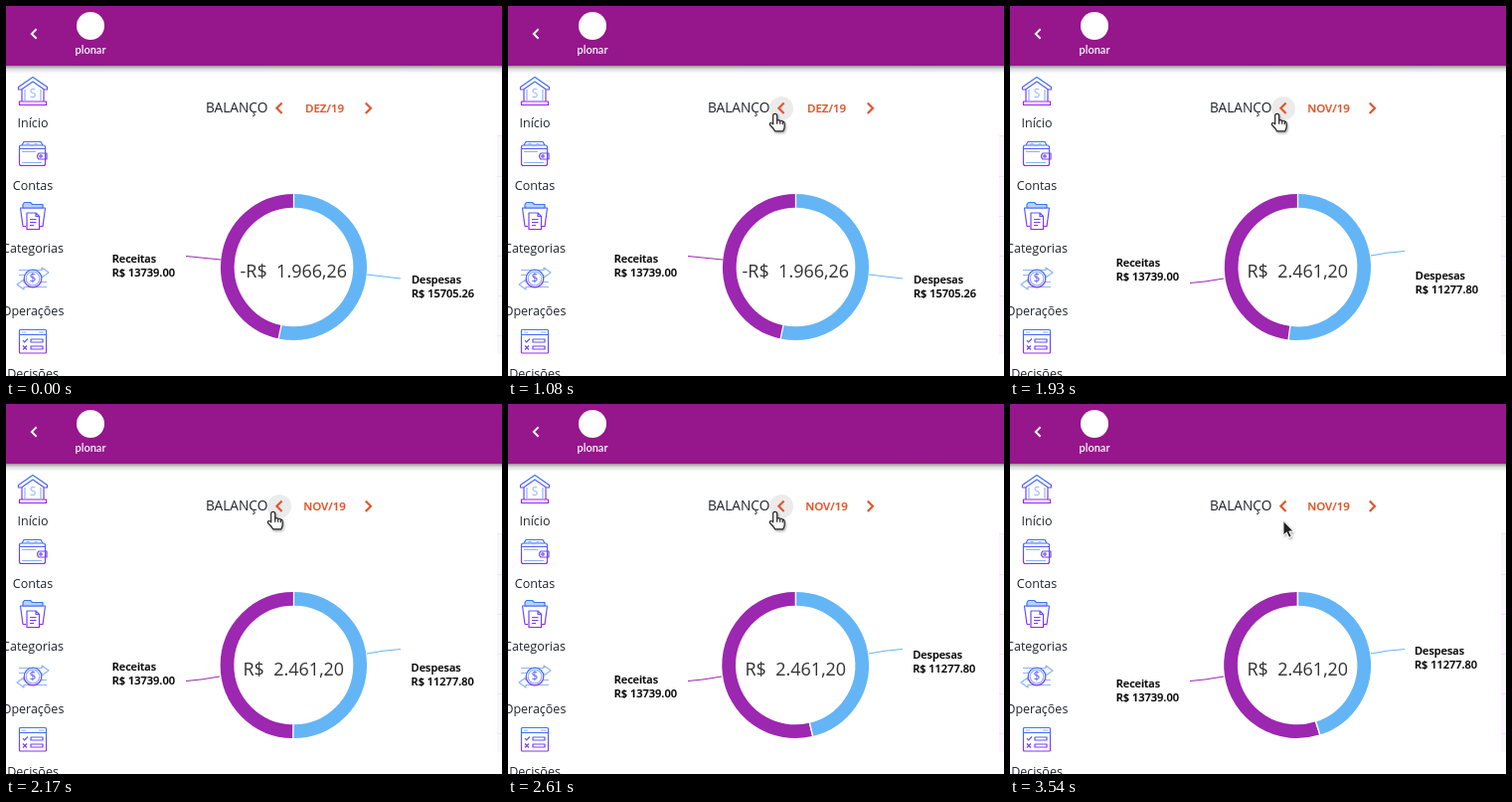
Recreate the animation shown at these times as an HTML page. Size 499 by 372 pixels, loop 3.6 s.

```html
<!DOCTYPE html>
<html lang="pt">
<head>
<meta charset="utf-8">
<style>
html, body { margin: 0; width: 100%; height: 100%; overflow: hidden; background: #fff; }
svg { display: block; width: 499px; height: 372px; font-family: "Open Sans", "Noto Sans", sans-serif; }
.menu { font-size: 12.5px; fill: #212529; text-anchor: middle; }
.label { font-size: 11px; font-weight: 600; fill: #000; stroke: #000; stroke-width: .2; }
.chevron { fill: none; stroke-width: 2.2; }
.icons { fill: none; stroke: url(#ink); stroke-width: 1.2; stroke-linejoin: round; }
.icons text { font-size: 12px; fill: #5b55f5; stroke: none; text-anchor: middle; }
.icons .faint { fill: #8fb4fa; }
.pale { stroke: #8fb4fa; }
</style>
</head>
<body>
<svg viewBox="0 0 499 372">
  <defs>
    <linearGradient id="ink" gradientUnits="userSpaceOnUse" x1="0" y1="0" x2="0" y2="28">
      <stop offset="0" stop-color="#2f7df6"/><stop offset="1" stop-color="#9a22f2"/>
    </linearGradient>
    <linearGradient id="shade" x1="0" y1="0" x2="0" y2="1">
      <stop offset="0" stop-color="#000" stop-opacity=".42"/>
      <stop offset=".4" stop-color="#000" stop-opacity=".14"/>
      <stop offset="1" stop-color="#000" stop-opacity="0"/>
    </linearGradient>
    <filter id="soft" x="-50%" y="-50%" width="200%" height="200%">
      <feDropShadow dx="1" dy="1.5" stdDeviation="1" flood-opacity=".35"/>
    </filter>
  </defs>

  <rect width="499" height="372" fill="#fff"/>
  <rect y="60" width="499" height="8" fill="url(#shade)"/>
  <rect width="499" height="60" fill="#96168c"/>
  <path class="chevron" d="M30.600 23.300l-4.800 4.700 4.800 4.700" stroke="#fff" style="stroke-width:1.9"/>
  <circle cx="85" cy="20" r="14" fill="#fff"/>
  <text x="85" y="48" fill="#fff" font-size="11" font-weight="600" text-anchor="middle" style="font-family:Lato,sans-serif">plonar</text>

  <g class="icons">
    <g transform="translate(12 71)">
      <path d="M.5 10.500L15 .5l14.500 10v2.500h-3L15 5 3.500 13h-3zM4 13v12M26 13v12M1.500 25h27v3.500h-27z"/>
      <path class="pale" d="M7 13v12M23 13v12"/>
      <text class="faint" x="15" y="21">S</text>
    </g>
    <g transform="translate(13 135)">
      <path d="M3 5l2-3.500h17l2 3.500M2.500 5h22q2 0 2 2v16.500q0 2-2 2h-22q-2 0-2-2V7q0-2 2-2zM.5 8.500h26M20 13h8v6h-8q-3-3 0-6z"/>
      <path class="pale" d="M7 4.500q2-2 4 0t4 0 4 0M3 11.500h14M3 22.500h20"/>
      <circle cx="22" cy="16" r="1.200"/>
    </g>
    <g transform="translate(14 197)">
      <path d="M3 24.500L.5 6h25l-2.500 18.500h-4M3 24.500h3"/>
      <path d="M3 6V2.500l1.500-2h6l2 2H23V6z" fill="#b9d2fd"/>
      <path d="M7 11h9l3.500 3.500v13H7zM16 11v3.500h3.500M10 17.500h6.500M10 20.500h6.500M10 23.500h4"/>
    </g>
    <g transform="translate(11 261)">
      <path class="pale" d="M2 4.500h23V2l7 5-7 5V9.500H2M30 16.500H7V14l-7 5 7 5v-2.500h23"/>
      <circle cx="16" cy="13" r="8.800" fill="#fff"/>
      <circle class="pale" cx="16" cy="13" r="6.800"/>
      <text x="16" y="17.300">$</text>
    </g>
    <g transform="translate(13 325)">
      <rect x=".5" y=".5" width="27" height="23.500" rx="1"/>
      <path d="M.5 5.500h27M4 11l1.500 2L9 9.500M4 16.500l4 4M8 16.500l-4 4"/>
      <path class="pale" d="M3 3h4M20 3h5"/>
      <path d="M12 10h12v3H12zM12 17h12v3H12z"/>
    </g>
  </g>
  <g id="menu" class="menu"></g>

  <rect x="494" y="130" width="5" height="220" fill="#fbf5fc"/>
  <path d="M494 130.500h5m-5 41h5m-5 40h5m-5 40h5m-5 40h5m-5 40h5" stroke="#f1e4f3"/>

  <circle id="hover" cx="275" cy="103" r="12"/>
  <circle id="ripple" cx="275" cy="103"/>
  <text x="201" y="107" font-size="13.700" fill="#212529">BALANÇO</text>
  <text id="month" x="320.500" y="107" font-size="11.500" font-weight="600" fill="#e2572b" stroke="#e2572b" stroke-width=".2" text-anchor="middle"></text>
  <path class="chevron" d="M277.600 97.500l-5.200 5.300 5.200 5.300M361.800 97.500l5.200 5.300-5.200 5.300" stroke="#e2572b"/>

  <g fill="none" stroke-width="13.700">
    <path id="out" stroke="#64b5f6"/>
    <path id="in" stroke="#9c27b0"/>
  </g>
  <path id="gaps" stroke="#fff" stroke-width="1.300"/>
  <path id="inLine" stroke="#9c27b0" fill="none"/>
  <path id="outLine" stroke="#64b5f6" fill="none"/>
  <text id="total" x="289.300" y="273" font-size="18" fill="#333" text-anchor="middle"></text>
  <g id="inLabel" class="label"><text>Receitas</text><text y="14">R$ 13739.00</text></g>
  <g id="outLabel" class="label"><text>Despesas</text><text id="spent" y="14"></text></g>

  <g filter="url(#soft)">
    <path id="hand" fill="#fff" stroke="#222" stroke-width="1.200" stroke-linejoin="round"
      d="M-2 1.500Q-2-.5 0-.5T2 1.500V6.500q1.500-1.300 3 .3 1.700-1 2.600.7Q9.500 7 9.500 9.500v3q0 2-1.500 4.500H0Q-1.500 14-5 11q-1-2 .7-2.300Q-3 8.800-2 10zM2 6.500v3.500M5 7v3M7.600 7.700v2.800"/>
    <path id="arrow" fill="#222" stroke="#fff" stroke-width=".9"
      d="M0 0v14.500l3.300-3 2.500 5.300 2.400-1.100-2.400-5.200h4.400z"/>
  </g>
</svg>
<script>
const LOOP = 3600, CX = 289.5, CY = 262.5, R = 66.7;
const el = id => document.getElementById(id);
const set = (id, attrs) => { for (const k in attrs) el(id).setAttribute(k, attrs[k]); };
const ramp = (t, from, to) => Math.min(1, Math.max(0, (t - from) / (to - from)));
const mix = (a, b, p) => a + (b - a) * p;
const quadInOut = u => u < .5 ? 2 * u * u : 1 - 2 * (1 - u) ** 2;
const move = (x, y) => ({ transform: `translate(${x} ${y})` });
const write = (id, s) => { if (el(id).textContent !== s) el(id).textContent = s; };

el("menu").innerHTML = ["Início", "Contas", "Categorias", "Operações", "Decisões"]
  .map((name, i) => `<text x="27" y="${122 + i * 63}">${name}</text>`).join("");

function polar(turn, r) {
  const a = turn * 2 * Math.PI;
  return `${CX + r * Math.sin(a)} ${CY - r * Math.cos(a)}`;
}
function arc(from, to) {
  return `M${polar(from, R)}A${R} ${R} 0 ${to - from > .5 ? 1 : 0} 1 ${polar(to, R)}`;
}
const gap = turn => `M${polar(turn, 58)}L${polar(turn, 75)}`;

function drawPie(t) {
  const loaded = t >= 1440;
  const p = quadInOut(ramp(t, 1510, 3010));
  const split = mix(15705.26 / 29444.26, 11277.8 / 25016.8, p);
  set("out", { d: arc(0, split) });
  set("in", { d: arc(split, 1), ...move(-.8 * p, 0) });
  set("gaps", { d: gap(0) + gap(split) });
  set("inLine", { d: loaded ? "M181 278.5Q196 277.500 215 274" : "M181 251.500L216 255" });
  set("outLine", { d: loaded ? "M363 251Q380 247.500 397 246.500" : "M363 270L397 274" });
  set("inLabel", move(106.8, Math.round(mix(258, 285, p))));
  set("outLabel", move(mix(408, 407, p), Math.round(mix(279, 252, p))));
  write("spent", loaded ? "R$ 11277.80" : "R$ 15705.26");
  write("total", loaded ? "R$\u00a0\u00a02.461,20" : "-R$\u00a0\u00a01.966,26");
}

function drawPointer(t) {
  const enter = quadInOut(ramp(t, 490, 690)), leave = quadInOut(ramp(t, 3330, 3530));
  const x = mix(mix(274, 268.7, enter), 275, leave);
  const y = mix(mix(113, 108.8, enter), 117.5, leave);
  const isHand = t >= 540 && leave < .7;
  set("hand", { ...move(x, y), visibility: isHand ? "visible" : "hidden" });
  set("arrow", { ...move(x, y), visibility: t >= 490 && !isHand ? "visible" : "hidden" });
  set("hover", { "fill-opacity": .08 * ramp(t, 540, 700) * (1 - ramp(t, 3390, 3530)) });
  set("ripple", {
    r: 12 * Math.sqrt(ramp(t, 1080, 1380)),
    "fill-opacity": .1 * (1 - ramp(t, 1320, 1700))
  });
}

function draw(t) {
  write("month", t < 1160 ? "DEZ/19" : "NOV/19");
  drawPie(t);
  drawPointer(t);
}

const start = performance.now();
function tick() {
  draw((performance.now() - start) % LOOP);
  requestAnimationFrame(tick);
}
tick();
</script>
</body>
</html>
```
